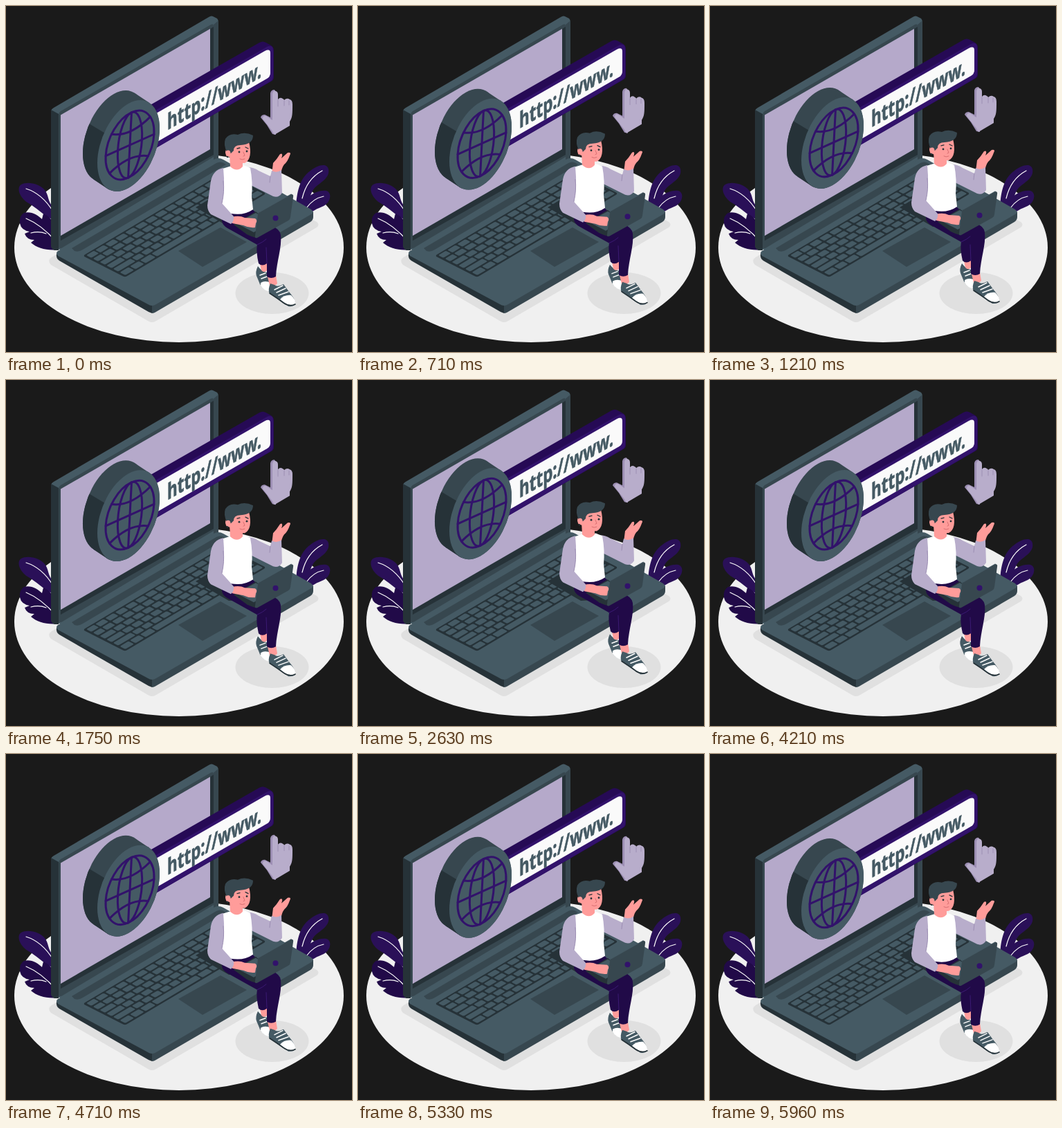
These frames come from a looping animation (500 px wide and 500 px high, 6 s). An HTML page:

```html
<!DOCTYPE html>
<html lang="en">
<head>
<meta charset="utf-8">
<title>Web address</title>
<style>
html,body{margin:0;height:100%;overflow:hidden;background:#1a1a1a}
svg{display:block;width:100%;height:100%}
.line{fill:none;stroke-linecap:round;stroke-linejoin:round}
.slate{fill:#455a64}.deep{fill:#37474f}.dark{fill:#263238}
.skin{fill:#ff9c9a}.lilac{fill:#b8adcb}.leaf{fill:#2a1058}.navy{fill:#210a48}
#wire *{vector-effect:non-scaling-stroke}
text{font:700 32px "Open Sans","Noto Sans",sans-serif;stroke:#455a64;stroke-width:.7}
</style>
</head>
<body>
<svg viewBox="0 0 500 500">
<defs>
  <clipPath id="lower"><path d="M100 158L150 188V270H100Z"/></clipPath>
  <g id="rim">
    <circle r="1" transform="matrix(45 -25 0 61 156 188)"/>
    <path d="M206.500 139.500L147.500 264.500L126.500 250.500L185.500 125.500Z"/>
    <circle r="1" transform="matrix(45 -25 0 61 177 202)"/>
  </g>
</defs>

<!-- floor and shadows -->
<ellipse cx="250" cy="349" rx="238" ry="137" fill="#f0f0f0"/>
<path fill="#e0e0e0" d="M66 363L300 228L449 312Q454 316 449 320L217 455Q211 459 205 455L65 374Q59 368 66 363Z"/>
<ellipse cx="384.500" cy="415" rx="53" ry="30" fill="#e0e0e0"/>

<!-- plants -->
<path class="leaf" d="M68 309C52 301 45 292 31 284C21 278 14 263 22 258C31 253 49 257 56 266C62 273 60 283 68 290Z"/>
<path class="navy" d="M76 352C60 354 45 350 36 342L41 338Q30 338 27 329L34 326Q22 324 20 314Q19 303 26 299C36 296 46 302 52 308L54 300C62 303 70 312 76 326Z"/>
<path class="leaf" d="M419 287C421 270 423 250 440 238C450 230 464 226 466 236C468 247 458 253 449 260C440 267 441 276 432 292Z"/>
<path class="leaf" d="M425 294C430 278 447 265 463 267C472 270 469 284 459 289C450 293 441 296 438 303Z"/>
<path class="line" stroke="#fff" stroke-width="1.200" d="M29 264Q52 271 68 297M29 307Q51 316 72 340M36 328Q48 325 58 329M428 278C432 261 442 246 457 238M434 292Q444 278 459 275"/>

<!-- big laptop -->
<path class="slate" d="M65 153Q65 149 69 147L293 16Q297 13 301 16L305 18Q307 20 307 23V220L82 352H70Q65 350 65 345Z"/>
<path class="dark" d="M65 150L76 156V353H70Q65 351 65 346Z"/>
<path class="deep" d="M76 157Q76 154 79 152L296 27Q300 25 300 29V218L80 350H76Z"/>
<path class="deep" d="M300 27L307 21V221L300 224Z"/>
<path class="dark" d="M295 33L300 30V215L79 339V332L295 207Z"/>
<path fill="#b5a9ca" d="M79 157.500L295 33V207L79 332Z"/>
<path class="dark" d="M73 358L211 432V444L206 442L77 368Q72 365 73 358Z"/>
<path class="deep" d="M211 432L444 297V305Q444 309 440 312L215 443Q213 444 211 444Z"/>
<path class="slate" d="M75 354L300 222Q307 218 314 222L441 294Q446 298 441 301L217 431Q211 435 205 431L75 361Q71 357 75 354Z"/>
<path class="deep" d="M95 350L304 227Q311 223 318 229L111 352Q105 356 99 354Z"/>
<g transform="matrix(1 -.593 1 .508 111 361)">
  <rect class="dark" width="204" height="61" rx="3"/>
  <g id="keys" class="slate"></g>
</g>
<path class="deep" d="M249 354L310 320L348 341L284 377Z"/>
<path class="dark" d="M274 291L294 279L330 300L340 318L322 319Z"/>

<g id="float">
  <!-- address bar -->
  <path fill="#260a55" d="M205 145L366 53Q371 50 376 53L383 57Q387 60 387 64V103Q387 107 383 109L205 212Z"/>
  <path fill="#32126b" d="M205 157L377 59Q386 55 386 64V102Q386 107 382 109L205 212Z"/>
  <path fill="#fafafa" d="M205 162L374 65Q382 61 382 68V97Q382 102 377 105L205 204Z"/>
  <text class="slate" transform="matrix(.7 -.395 0 1 233 179.500)">http://www.</text>

  <!-- globe -->
  <use href="#rim" class="deep"/>
  <use href="#rim" class="dark" clip-path="url(#lower)"/>
  <circle class="slate" r="1" transform="matrix(45 -25 0 61 177 202)"/>
  <g id="wire" class="line" stroke="#32126b" stroke-width="3" transform="matrix(35 -19 0 46 179 201) rotate(4)">
    <circle r="1"/>
    <ellipse rx=".5" ry="1"/>
    <path d="M0 -1V1M-1 0H1M-.8 -.6Q0 -.25 .8 -.6M-.8 .6Q0 .25 .8 .6"/>
  </g>

  <!-- pointing hand -->
  <path fill="#9c8eb3" d="M382 126Q383 121 388 121L391 126L389 159L390 186L385 185L377 172L368 161Q369 157 374 157L382 161Z"/>
  <path class="lilac" d="M385 127Q386 121 390 123Q393 124 393 128V135Q396 131 400 134Q402 135 402 136Q406 132 410 135Q414 136 414 142C414 156 414 161 410 167V173L388 186Q386 184 385 181L371 163Q371 158 376 159L385 165Z"/>
  <path class="line" stroke="#9c8eb3" d="M393 136V145M402 137V144M409 137V143"/>

  <!-- back shoe and ankles -->
  <path class="slate" d="M364 376Q360 384 362 390L367 402Q371 410 381 413L384 402L377 385Q370 384 364 376Z"/>
  <path fill="#fff" d="M368 400Q374 396 383 400L381 413Q372 411 368 404Z"/>
  <path class="line" stroke="#fff" stroke-width="1.500" d="M367 389L375 386M369 394L377 391"/>
  <path class="skin" d="M366 368L377 367L378 381Q374 387 369 382ZM378 391L390 389L392 401Q387 407 381 404Z"/>

  <!-- front shoe -->
  <path class="slate" d="M382 401Q378 410 381 416L408 434Q418 435 418 429Q417 422 409 413L401 402Q392 407 388 403Z"/>
  <path fill="#fff" d="M396 424Q402 417 412 418Q419 425 418 430Q412 435 404 430Z"/>
  <path class="line" stroke="#fff" stroke-width="1.500" d="M388 410L400 404M391 414L404 408M394 418L408 413"/>
  <path class="line" stroke="#263238" stroke-width="1.600" d="M381 415Q392 422 401 429Q410 435 418 431"/>

  <!-- legs -->
  <path class="navy" d="M314 302Q308 314 320 321L363 345Q361 354 365 372Q370 377 377 372L377 391Q383 395 390 391C391 369 399 349 397 331Q396 322 382 317L356 294Z"/>
  <path class="line" stroke="#3b1a73" d="M363 345Q372 341 376 337M377 372L376 349"/>

  <!-- raised arm -->
  <path class="skin" d="M384 243L386 227Q391 222 396 214Q400 212 399 217L398 220L407 212Q413 211 410 216Q407 225 402 229Q398 234 397 245Z"/>
  <path class="lilac" d="M349 233Q358 233 365 238L382 246L384 238Q391 242 398 237L399 270Q394 278 386 275L354 259Z"/>
  <path class="line" stroke="#9c8eb3" d="M382 246L381 255"/>

  <!-- torso -->
  <path fill="#fff" d="M313 235L326 231Q335 239 343 230L353 234Q357 255 355 275L357 294Q340 306 314 297Q307 266 313 235Z"/>
  <path class="skin" d="M323 214L342 222V232Q334 241 324 232Z"/>

  <!-- small laptop -->
  <path class="dark" d="M329 316L361 297L386 320L362 335Q356 334 348 330Z"/>
  <path class="slate" d="M333 314L361 299L384 312L358 327Z"/>
  <path class="skin" d="M326 305Q337 302 345 306L360 307Q364 310 361 314L360 320Q351 321 343 317L327 314Z"/>
  <path class="lilac" d="M314 234Q299 237 296 253L291 288Q291 296 296 301L325 315Q330 311 329 304L312 285Q317 265 314 234Z"/>
  <path class="line" stroke="#9c8eb3" d="M312 285Q316 268 314 253"/>
  <path class="deep" d="M366 298L412 272Q416 272 415 276L411 305Q411 308 408 310L363 335Q359 336 360 332L364 301Q364 299 366 298Z"/>
  <path class="line" stroke="#455a64" d="M366 298L412 272"/>
  <circle cx="389.500" cy="306.500" r="4" fill="#32126b"/>

  <!-- head -->
  <path class="skin" d="M322 198L351 196C355 212 353 223 345 227Q333 228 327 219Q319 219 317 212Q317 206 322 207Z"/>
  <path class="deep" d="M319 211Q314 200 317 192Q323 183 335 186Q345 181 357 187Q357 200 339 201Q329 201 329 209L325 213Z"/>
  <ellipse class="skin" cx="321" cy="213" rx="3.500" ry="4.500"/>
  <circle class="dark" cx="320" cy="218" r="1.200"/>
  <circle class="dark" cx="337" cy="211" r="1.400"/>
  <circle class="dark" cx="348" cy="210" r="1.400"/>
  <path class="line" stroke="#263238" stroke-width="1.300" d="M334 206L338 205M346 204L350 206"/>
  <path class="line" stroke="#d96f72" d="M343 211L345 216L343 217M338 221Q341 223 345 221"/>
</g>
</svg>
<script>
const LOOP = 6000, LIFT = 10;
const group = document.getElementById('float');
const key = (x, y, w, h) => `<rect x="${x}" y="${y}" width="${w}" height="${h}" rx="1.5"/>`;

// Each row fills the keyboard width; its first key sets the stagger.
const firstKeys = [11, 11, 17, 20, 25];
let keys = '';
firstKeys.forEach((first, row) => {
  const y = 2 + row * 9.7;
  const width = (197 - first) / 13;
  keys += key(3, y, first, 7.4);
  for (let i = 0; i < 13; i++) keys += key(5 + first + i * width, y, width - 2.4, 7.4);
});
let x = 3;
for (const w of [13, 13, 15, 64, 15, 13, 13, 13, 13, 13]) {
  keys += key(x, 50.5, w - 0.5, 8);
  x += w + 1.6;
}
document.getElementById('keys').innerHTML = keys;

// The group rises and sinks at constant speed.
const start = performance.now();
function draw(now) {
  const phase = Math.max(0, now - start) % LOOP / LOOP;
  const rise = 1 - Math.abs(1 - 2 * phase);
  group.setAttribute('transform', `translate(0 ${-LIFT * rise})`);
  requestAnimationFrame(draw);
}
draw(start);
</script>
</body>
</html>
```
